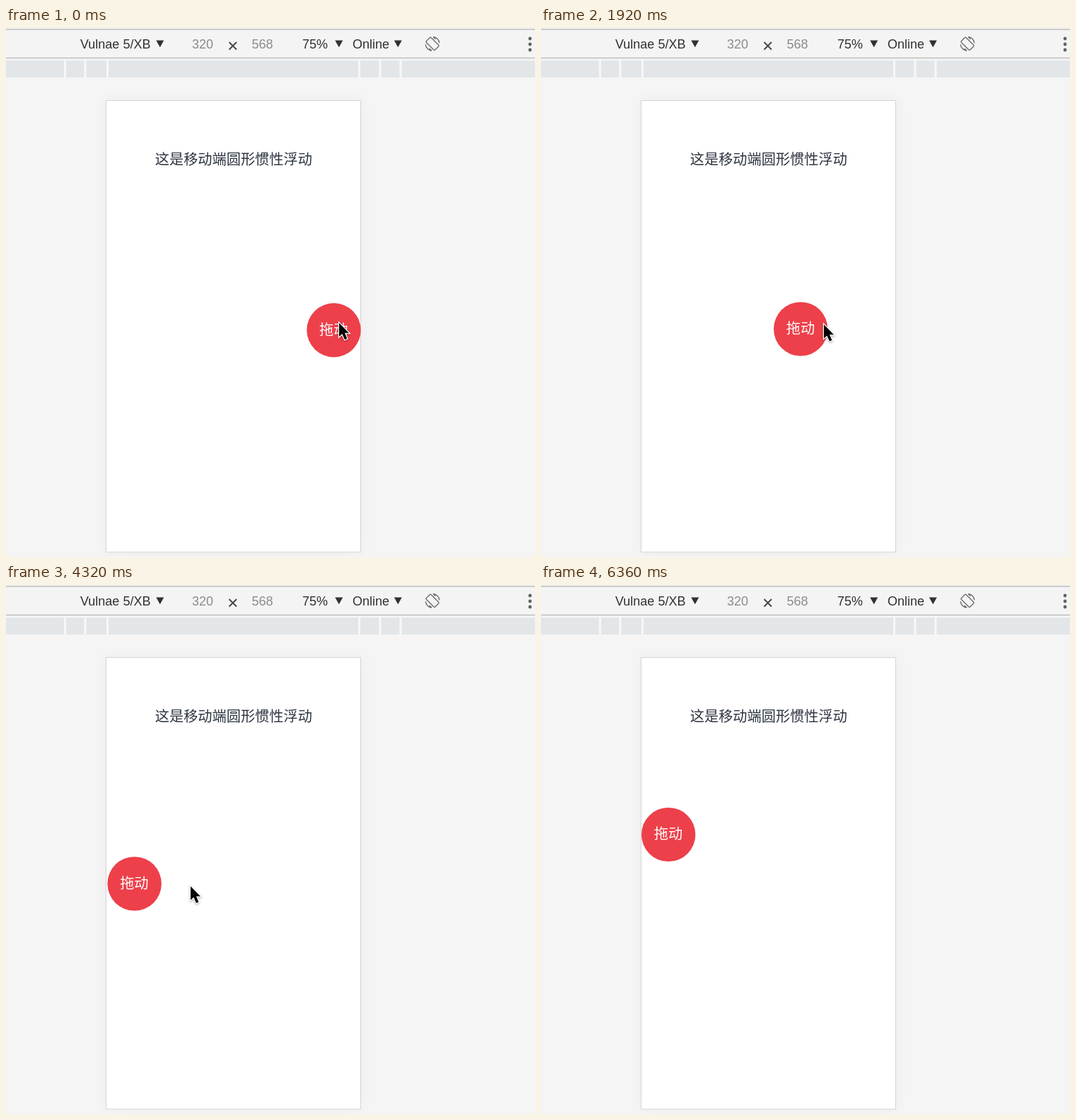
Write an HTML page that moves like this. It is 748 px wide and 748 px high and loops after 6660 ms.

```html
<!DOCTYPE html>
<html lang="zh-CN">
<head>
<meta charset="utf-8">
<title>惯性浮动</title>
<style>
  html, body { margin: 0; width: 100%; height: 100%; overflow: hidden; background: #f5f5f5; }
  svg { display: block; width: 100vw; height: 100vh; }
  .bar { font: 18px "Liberation Sans", Arial, sans-serif; fill: #303134; }
  .dim { fill: #8b8b8b; }
  .cjk { font: 20.2px "Noto Sans CJK SC", "Noto Sans CJK", sans-serif; text-anchor: middle; }
  .phone { filter: drop-shadow(0 0 9px rgba(0, 0, 0, .04)); }
  #cursor { filter: drop-shadow(0 1.5px 1.5px rgba(0, 0, 0, .35)); }
</style>
</head>
<body>
<svg viewBox="0 0 748 748">
  <rect width="748" height="748" fill="#f5f5f5"/>

  <!-- toolbar -->
  <rect width="748" height="43" fill="#f4f4f4"/>
  <path d="M0 2H748M0 42.5H748" stroke="#bfbfbf" stroke-width="1.3"/>
  <g class="bar">
    <text x="105" y="28.5">Vulnae 5/XB</text>
    <text x="263" y="28.5" class="dim">320</text>
    <text x="347.5" y="28.5" class="dim">568</text>
    <text x="419" y="28.5">75%</text>
    <text x="490" y="28.5">Online</text>
  </g>
  <path id="arrow" d="M212.3 17.5h11l-5.5 9.7z" fill="#303134"/>
  <use href="#arrow" x="253"/>
  <use href="#arrow" x="336.5"/>
  <path d="M315.5 20l10.5 10.5m0-10.5l-10.5 10.5" stroke="#45484b" stroke-width="2"/>
  <g transform="translate(603 22.3)" fill="none" stroke="#6b6e71" stroke-width="1.4">
    <rect x="-4.8" y="-8.8" width="9.6" height="17.6" rx="1.5" transform="rotate(-45)"/>
    <path id="turn" d="M1-9.8A9.8 9.8 0 0 1 9.8-1M1-9.8l3.4 3.2"/>
    <use href="#turn" transform="rotate(180)"/>
  </g>
  <path d="M741 15v16.1" stroke="#606366" stroke-width="4.8" stroke-linecap="round" stroke-dasharray="0 8"/>

  <!-- width presets -->
  <rect y="46" width="748" height="24" fill="#e3e6e8"/>
  <path d="M83.5 46v24m28.5-24v24m31.5-24v24m356-24v24m29.5-24v24m29-24v24" stroke="#f7f7f7" stroke-width="3"/>

  <!-- page -->
  <rect class="phone" x="141.5" y="102.5" width="360" height="638.5" fill="#fff" stroke="#d5d5d5"/>
  <text class="cjk" x="321.8" y="193" fill="#2c3440">这是移动端圆形惯性浮动</text>

  <g id="ball">
    <circle r="38.2" fill="#ed404a"/>
    <text class="cjk" x="-.3" y="6.5" fill="#fff">拖动</text>
  </g>
  <path id="cursor" d="M1 1V20.5L5.4 16.6L9 24.7L12.4 23.2L9 15.3H15Z"
        stroke="#fff" stroke-width="2.4" paint-order="stroke"/>
</svg>

<script>
const LOOP = 6660, STEP = 60, LAST = 6360, GONE = 5700;
const LAG = 60, GLIDE = 510;
const LEFT = 180.2, RIGHT = 463.5;

// Turning points of the hand: time, x, y
const hand = [
  [120, 470, 416], [600, 320, 454], [960, 386, 414], [1080, 358, 437],
  [1530, 178, 411], [2010, 450, 420], [2400, 335, 455], [2640, 360, 440],
  [3240, 463, 433], [3360, 463, 433], [3600, 312, 430], [4320, 260, 425],
  [4530, 186, 415], [5160, 438, 365], [5280, 399, 423], [5640, 390, 608]
];

// Each throw: grabbed and let go at these times, starting from rest
const throws = [
  { grab: 120, drop: 1020, x: RIGHT, y: 427.2 },
  { grab: 1530, drop: 2700, x: LEFT, y: 419.4 },
  { grab: 3360, drop: 3930, x: RIGHT, y: 432.4 },
  { grab: 4530, drop: 5220, x: LEFT, y: 422.3 },
  { grab: LOOP, x: LEFT, y: 352.9 }
];

const mix = (a, b, p) => [0, 1].map(i => a[i] + (b[i] - a[i]) * p);
const easeOut = p => 1 - (1 - p) ** 3;

function handAt(t) {
  const i = hand.findIndex(k => k[0] > t);
  if (i < 0) return hand[hand.length - 1].slice(1);
  if (i === 0) return hand[0].slice(1);
  const [t0, ...a] = hand[i - 1], [t1, ...b] = hand[i];
  return mix(a, b, (t - t0) / (t1 - t0));
}

// The held ball trails the hand by LAG
function heldAt({ grab, x, y }, t) {
  const [gx, gy] = handAt(grab);
  const [hx, hy] = handAt(Math.max(grab, t - LAG));
  return [x + hx - gx, y + hy - gy];
}

// Once dropped, the ball glides to rest at the next edge
function ballAt(t) {
  const n = throws.findLastIndex(k => k.grab <= t);
  if (n < 0) return [throws[0].x, throws[0].y];
  const now = throws[n], next = throws[n + 1];
  if (t < now.drop) return heldAt(now, t);
  const p = Math.min(1, (t - now.drop) / GLIDE);
  return mix(heldAt(now, now.drop), [next.x, next.y], easeOut(p));
}

const ball = document.getElementById('ball');
const cursor = document.getElementById('cursor');
const place = (el, pos) => el.setAttribute('transform', `translate(${pos})`);

function draw(now) {
  const t = Math.min(LAST, Math.floor((now % LOOP) / STEP) * STEP);
  place(ball, ballAt(t));
  place(cursor, handAt(t));
  cursor.style.display = t < GONE ? '' : 'none';
}

const start = performance.now();
function tick() {
  draw(performance.now() - start);
  requestAnimationFrame(tick);
}
tick();
</script>
</body>
</html>
```
